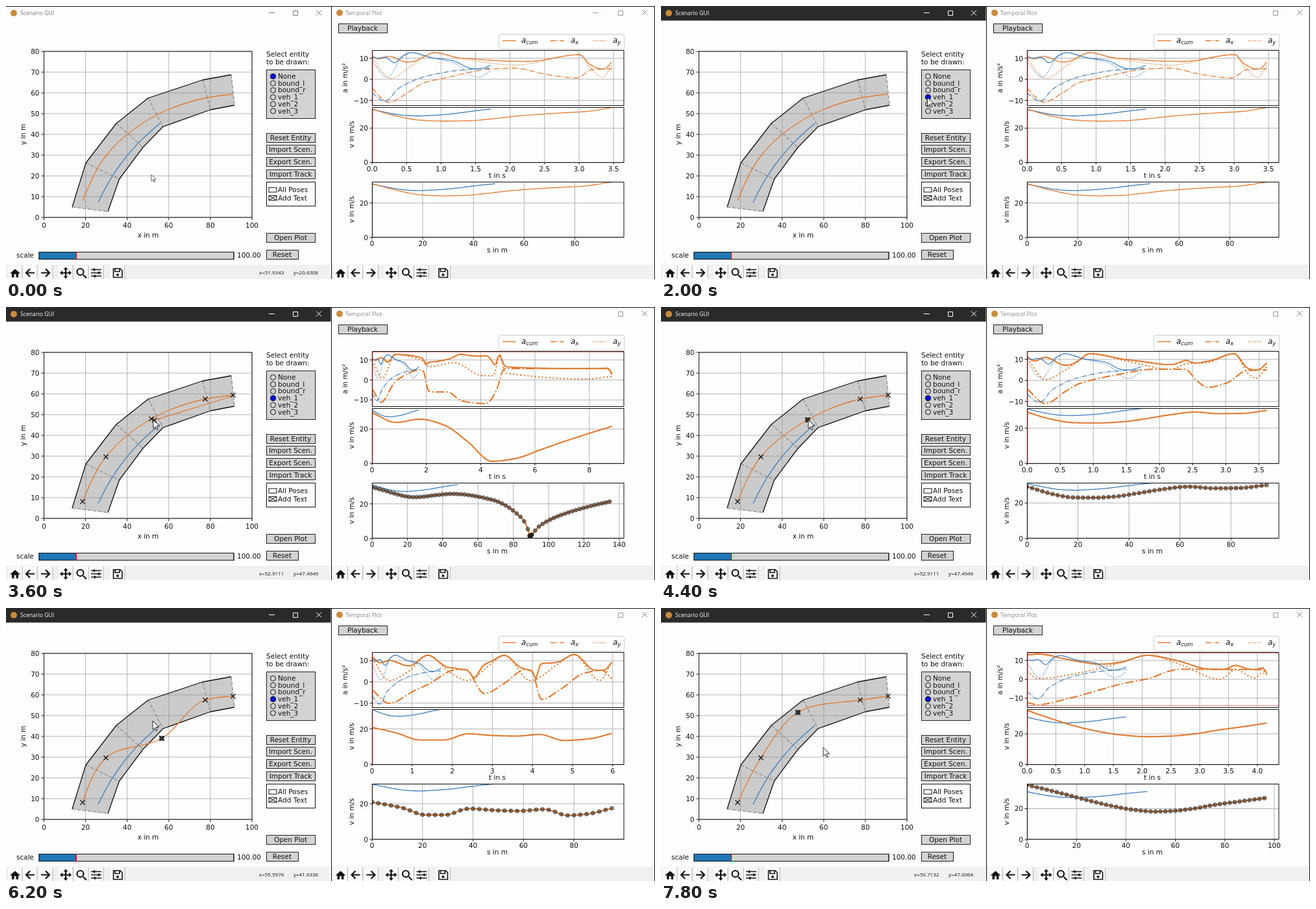
An HTML page that plays this animation: 1000x421 px, repeating every 8 s.

```html
<!DOCTYPE html>
<html lang="en">
<head>
<meta charset="utf-8">
<title>Scenario GUI</title>
<style>
html, body { margin: 0; width: 100%; height: 100%; overflow: hidden; background: #fdfdfd; }
svg { display: block; width: 100vw; height: 100vh; }
text { font: 10.5px "DejaVu Sans", sans-serif; fill: #111; }
.ui { font: 8.7px "Open Sans", "Noto Sans", sans-serif; }
.pos { font: 8px "Open Sans", "Noto Sans", sans-serif; }
.math { font: italic 12px "DejaVu Sans", sans-serif; }
.sub { font-size: 8.4px; }
.mid { text-anchor: middle; }
.end { text-anchor: end; }
.line { fill: none; stroke-linejoin: round; }
.grid { stroke: #b4b4b4; stroke-width: 1; }
.tick { stroke: #111; stroke-width: 1; }
.frame { fill: none; stroke: #111; stroke-width: 1; }
.btn { fill: #d3d3d3; stroke: #222; stroke-width: 1; }
.icon { fill: none; stroke: #111; stroke-width: 2.2; }
.limit { stroke: #f22; stroke-width: 1; opacity: .6; }
</style>
</head>
<body>
<svg viewBox="0 0 1000 421">
  <defs>
    <clipPath id="c1"><rect x="564" y="68" width="388" height="85"/></clipPath>
    <clipPath id="c2"><rect x="564" y="156" width="388" height="85"/></clipPath>
    <clipPath id="c3"><rect x="564" y="271" width="388" height="86"/></clipPath>
  </defs>
  <g id="fixed"></g>
  <g id="live"></g>
</svg>
<script>
const LOOP = 8000, STEP = 200, N = 120, X0 = 564, W = 369.5, OTHER_W = 183, OTHER_S = 48.6;
const ORANGE = '#e07a30', BLUE = '#3f7fbe';
const lerp = (a, b, k) => a + (b - a) * k;
const unit = (t, a, b) => Math.min(1, Math.max(0, (t - a) / (b - a)));

// ---------- svg helpers ----------
const text = (x, y, s, c = '', more = '') => `<text x="${x}" y="${y}" class="${c}" ${more}>${s}</text>`;
const rect = (x, y, w, h, c, more = '') => `<rect x="${x}" y="${y}" width="${w}" height="${h}" class="${c}" ${more}/>`;
const path = (d, c = 'line', more = '') => `<path d="${d}" class="${c}" ${more}/>`;
const seg = (x1, y1, x2, y2, c, more = '') => path(`M${x1} ${y1}L${x2} ${y2}`, c, more);
const circle = (x, y, r, more) => `<circle cx="${x}" cy="${y}" r="${r}" ${more}/>`;
const poly = pts => 'M' + pts.map(p => p[0].toFixed(1) + ' ' + p[1].toFixed(1)).join('L');
const turned = (x, y, s) => text(x, y, s, 'mid', `transform="rotate(-90 ${x} ${y})"`);
const button = (x, y, w, s) => rect(x + .5, y + .5, w, 14, 'btn') + text(x + w / 2, y + 10.5, s, 'mid');

// ---------- curves ----------
// Monotone cubic through x,y points, sampled evenly.
function resample(p, w) {
  const d = p.slice(1).map((q, i) => (q[1] - p[i][1]) / (q[0] - p[i][0]));
  const m = p.map((_, i) => {
    if (!i) return d[0];
    if (i === d.length) return d[i - 1];
    return d[i - 1] * d[i] <= 0 ? 0 : 2 * d[i - 1] * d[i] / (d[i - 1] + d[i]);
  });
  return Array.from({ length: N + 1 }, (_, n) => {
    const x = Math.min(p[p.length - 1][0], Math.max(p[0][0], X0 + w * n / N));
    let i = 0;
    while (i < d.length - 1 && x > p[i + 1][0]) i++;
    const h = p[i + 1][0] - p[i][0], u = (x - p[i][0]) / h, v = 1 - u;
    return p[i][1] * v * v * (1 + 2 * u) + p[i + 1][1] * u * u * (3 - 2 * u) + h * u * v * (m[i] * v - m[i + 1] * u);
  });
}
const pairs = flat => flat.flatMap((x, i) => i % 2 ? [] : [[x, flat[i + 1]]]);
const even = (ys, w) => ys.map((y, i) => [X0 + w * i / (ys.length - 1), y]);

// t, s: end of run; v: top of speed axis; zero, scale: acceleration axis; gap: dot spacing in m
function run(t, s, v, zero, scale, gap, lon, lat, vel, w = W) {
  const r = { t, s, v, zero, scale, gap };
  r.lon = resample(pairs(lon), w);
  r.lat = resample(pairs(lat), w);
  r.vel = resample(even(vel, w), w);
  r.cum = r.lon.map((y, i) => zero - Math.hypot(zero - y, zero - r.lat[i]));
  return r;
}

const first = run(3.475, 94.6, 32.3, 113, 3.25, 2,
  [565,127, 575,139, 590,148.5, 620,133, 645,118, 672,112, 750,97, 785,96, 830,105, 880,111, 903,98, 933,97],
  [565,80, 575,95, 592,112, 625,92, 645,78, 660,72, 700,81, 785,91, 884,75, 900,95, 920,110, 933,92],
  [159, 169.5, 176, 177.5, 177, 174, 170, 167, 164.7, 162.5, 156.5]);
const extra = run(8.83, 135.8, 32.2, 112.5, 3.08, 2.1,
  [565,127, 578,147, 600,115, 632,98, 642,97, 652,131, 680,131, 703,145, 740,149, 755,130, 768,95, 928,95, 933,104],
  [565,83, 580,110, 600,73, 640,82, 652,92, 690,86, 735,106, 752,106, 760,73, 770,102, 895,111, 933,107],
  [163, 178, 173, 182, 208, 238, 233.5, 220.5, 207.5, 195.5, 184]);
const fitted = run(3.62, 94.1, 31.4, 113.3, 3.25, 2,
  [565,127, 592,149, 625,129, 645,118, 700,105, 760,96, 808,96, 825,113, 842,124, 872,117, 903,98, 933,97],
  [565,80, 592,112, 625,96, 645,82, 660,72, 720,84, 785,96, 812,87, 840,86, 883,72, 905,103, 917,110, 933,92],
  [162, 173, 178.5, 178.8, 177, 172, 166, 162, 164.5, 164, 159.5]);
const bent = run(5.98, 95, 31.2, 114, 3.27, 2.5,
  [565,127, 590,147, 630,127, 650,118, 695,95, 708,95, 737,132, 768,116, 800,95, 810,97, 825,141, 855,125, 890,101, 918,96, 933,109],
  [565,78, 590,112, 620,98, 650,73, 685,100, 712,112, 745,88, 768,73, 808,112, 850,87, 875,72, 915,112, 933,84],
  [184, 192.5, 203.5, 203.5, 194, 196.5, 197.5, 195, 204.3, 202, 193.5]);
const wide = run(4.21, 97.4, 35.9, 110, 2.9, 2,
  [565,146, 580,149, 630,139, 710,117, 750,109, 800,94.5, 927,95, 933,103],
  [565,98, 580,109, 640,101, 710,84, 750,73, 800,87, 862,110, 885,95, 915,108, 927,100, 933,103],
  [158, 170.5, 182, 190.5, 196, 198.4, 197.5, 194, 188, 183, 177.5]);
const settled = { ...wide, t: 4.165, s: 97, v: 36.2 };

// The second vehicle never changes; it is given on the first run's axes.
const other = run(first.t, OTHER_S, first.v, first.zero, first.scale, 2,
  [565,135, 584,147, 605,127, 645,109, 700,99, 747,96],
  [565,86, 587,110, 612,78, 625,72, 655,80, 690,88, 727,110, 747,100],
  [159.5, 163.5, 167, 169, 169.5, 168.7, 167.5, 165.7, 163.3, 161, 159], OTHER_W);

function mix(a, b, k) {
  const out = {};
  for (const key in a)
    out[key] = Array.isArray(a[key]) ? a[key].map((y, i) => lerp(y, b[key][i], k)) : lerp(a[key], b[key], k);
  return out;
}

// ---------- timeline ----------
const SELECT = 1800, EDIT = 2200, APPEND = 3200, FIT = 4400;
const DRAG = 5200, BENT = 6200, WIDE = 7000, LAST = 7800;

function runAt(t) {
  if (t < APPEND) return first;
  if (t < FIT) return extra;
  if (t < BENT) return mix(fitted, bent, unit(t, DRAG, BENT));
  if (t < WIDE) return mix(bent, wide, unit(t, BENT, WIDE));
  return mix(wide, settled, unit(t, WIDE, LAST));
}

function track(keys, t) {
  let i = 0;
  while (i < keys.length - 2 && t >= keys[i + 1][0]) i++;
  const [a, b] = [keys[i], keys[i + 1]], k = unit(t, a[0], b[0]);
  return a.slice(1).map((v, j) => lerp(v, b[j + 1], k));
}
const pointer = [[0, 224, 260], [1200, 410.5, 141], [2000, 410.5, 141], [3000, 227, 174], [4800, 227, 174],
  [DRAG, 237, 191], [5800, 240, 201], [BENT, 226, 174], [WIDE, 209, 159], [7200, 210, 160], [LAST, 250, 215]];
const coords = [[0, 51.9343, 20.6306], [2000, 110, 57], [3000, 52.9111, 47.4949], [FIT, 52.9111, 47.4949],
  [DRAG, 52.6669, 47.0064], [BENT, 55.5976, 41.6336], [WIDE, 47.2941, 51.6466], [LAST, 50.7132, 47.0064]];
const handle = [[0, 224, 172.5], [4200, 224, 172.5], [FIT, 226, 174], [DRAG, 226, 174], [BENT, 240, 201],
  [WIDE, 211, 160], [LAST, 211, 161]];

// ---------- fixed parts ----------
function toolbar(dx) {
  const slot = [14, 37, 61, 92, 116, 139, 172];
  const glyph = [
    path('M-8 1L0 -6L8 1H5V7H1.5V2H-1.5V7H-5V1Z', '', 'fill="#111"'),
    path('M7 0H-6M0 -6L-6 0L0 6', 'icon'),
    path('M-7 0H6M0 -6L6 0L0 6', 'icon'),
    path('M-6 0H6M0 -6V6', 'icon') + [0, 90, 180, 270].map(a => path('M9 0l-4 -3.5v7Z', '', `fill="#111" transform="rotate(${a})"`)).join(''),
    path('M3 3L8 8', 'icon') + circle(-1.5, -1.5, 5, 'class="icon"'),
    path('M-8 -5H8M-8 0H8M-8 5H8', 'icon', 'style="stroke-width:1.5"') + path('M-3 -7v4M4 -2v4M-2 3v4', 'icon'),
    path('M-6.5 -6.5H4L7 -3.5V7H-6.5ZM-4 -6V-2H3V-6', 'icon', 'style="stroke-width:1.6"') + circle(0, 3, 2, 'fill="#111"')
  ];
  return rect(dx, 399, 499, 22, '', 'fill="#f0f0f1"') + slot.map((x, i) =>
    rect(dx + x - 11, 400, 22, 21, '', 'fill="#fafafa"') + seg(dx + x + 11, 400, dx + x + 11, 421, 'grid') +
    `<g transform="translate(${dx + x} 411.5)">${glyph[i]}</g>`).join('');
}

function scenario() {
  let s = '';
  for (let i = 0; i <= 5; i++) {
    const x = 58.5 + i * 64.1;
    s += seg(x, 70, x, 326, 'grid') + seg(x, 326, x, 330, 'tick') + text(x, 342, i * 20, 'mid');
  }
  for (let i = 0; i <= 8; i++) {
    const y = 326 - i * 32;
    s += seg(58, y, 379, y, 'grid') + seg(54.5, y, 58, y, 'tick') + text(51.5, y + 4, i * 10, 'end');
  }
  const left = [[102, 310], [123, 242], [170, 181], [219, 142], [303, 114], [347, 106]];
  const right = [[157, 317], [174.5, 267], [211, 218], [242, 186], [315, 160], [352, 153]];
  s += path(poly([...left, ...right.slice().reverse()]) + 'Z', '', 'fill="#808080" opacity=".4"');
  left.forEach((p, i) => s += path(poly([p, right[i]]), 'line', 'stroke="#999" stroke-width="1.6" stroke-dasharray="5.5 2.5"'));
  s += [left, right].map(b => path(poly(b), 'line', 'stroke="#111" stroke-width="1.3"')).join('');
  s += path('M142 303C147 292 157 271 175 246S209 205 237 181', 'line', `stroke="${BLUE}" stroke-width="1.3"`);
  return s + rect(58.5, 70, 320.5, 256, 'frame') + text(219, 357, 'x in m', 'mid') + turned(30, 198, 'y in m');
}

function controls() {
  let s = text(401, 78, 'Select entity') + text(401, 90, 'to be drawn:') + rect(401.5, 98.5, 75, 75, 'btn');
  ['None', 'bound_l', 'bound_r', 'veh_1', 'veh_2', 'veh_3'].forEach((n, i) =>
    s += circle(411.5, 108.5 + i * 10.7, 4, 'class="frame"') + text(419, 112 + i * 10.7, n));
  ['Reset Entity', 'Import Scen.', 'Export Scen.', 'Import Track'].forEach((n, i) => s += button(401, 196 + Math.floor(i * 18.8), 75, n));
  s += button(401, 350, 75, 'Open Plot') + button(401, 376, 49, 'Reset') + button(512, 27, 75, 'Playback');
  s += rect(401.5, 271.5, 75, 37, 'frame') + rect(405, 280, 12, 7, 'frame') + rect(405, 292.5, 12, 7, 'frame') +
    path('M405 292.5l12 7m0 -7l-12 7', 'frame') + text(419, 287, 'All Poses') + text(419, 299.5, 'Add Text');
  return s + text(16, 388, 'scale') + rect(51, 379.5, 300, 11, 'btn') + rect(51, 380, 57, 10, '', 'fill="#1f77b4"') +
    rect(51, 379.5, 300, 11, 'frame') + seg(108.5, 379, 108.5, 391, '', 'stroke="#f00" stroke-width="1.2"') + text(356, 388, '100.00');
}

function temporal() {
  let s = circle(514, 10.5, 5, 'fill="#c98a3c"') + text(523, 14, 'Temporal Plot', 'ui', 'style="fill:#888"');
  s += path('M943.5 7.5h7v7h-7Z', 'frame', 'style="stroke:#999"') + path('M980 6l8 8m0 -8l-8 8', 'frame', 'style="stroke:#888"');
  s += rect(759.5, 43.5, 193, 23, '', 'rx="2" fill="#fff" stroke="#ccc"');
  [[765, 794, 'cum', ''], [839, 870, 'x', '9 2.2 1.5 2.2'], [905, 935, 'y', '1.4 2']].forEach(([x, tx, sub, dash]) =>
    s += seg(x, 53.5, x + 21, 53.5, 'line', `stroke="${ORANGE}" stroke-width="1.4" stroke-dasharray="${dash}"`) +
      text(tx, 57, `a<tspan class="math sub" dy="2">${sub}</tspan>`, 'math'));
  s += turned(526, 111, 'a in m/s²') + turned(536, 198, 'v in m/s') + turned(536, 314, 'v in m/s');
  return s + text(757, 265, 't in s', 'mid') + text(757, 380, 's in m', 'mid');
}

const edges = () => seg(501.5, 0, 501.5, 421, 'tick') + seg(999.5, 0, 999.5, 421, 'tick') + seg(0, .5, 1000, .5, 'tick');

// ---------- moving parts ----------
function titleBar(active) {
  const ink = active ? '#fff' : '#777', st = `style="stroke:${ink}"`;
  return (active ? rect(0, 0, 500.5, 22.5, '', 'fill="#2b2a28"') : path('M904 10.5h9', 'frame', 'style="stroke:#999"')) +
    circle(12, 11, 5, 'fill="#c98a3c"') + text(22, 14, 'Scenario GUI', 'ui', `style="fill:${ink}"`) +
    path('M405 10.5h9', 'frame', st) + path('M442.5 7.5h7v7h-7Z', 'frame', st) + path('M478 6.5l8 8m0 -8l-8 8', 'frame', st);
}

// Smooth path with chord-weighted tangents.
function spline(p) {
  const h = [], d = [];
  for (let i = 0; i < p.length - 1; i++) {
    const dx = p[i + 1][0] - p[i][0], dy = p[i + 1][1] - p[i][1];
    h.push(Math.hypot(dx, dy));
    d.push([dx / h[i], dy / h[i]]);
  }
  const n = h.length;
  const m = p.map((_, i) => !i || i === n ? null :
    [0, 1].map(c => (d[i - 1][c] * h[i] + d[i][c] * h[i - 1]) / (h[i - 1] + h[i])));
  m[0] = d[0].map((v, c) => 1.5 * v - .5 * m[1][c]);
  m[n] = d[n - 1].map((v, c) => 1.5 * v - .5 * m[n - 1][c]);
  return `M${p[0]}` + h.map((l, i) => 'C' + [0, 1].map(c => p[i][c] + m[i][c] * l / 3) + ' ' +
    [0, 1].map(c => p[i + 1][c] - m[i + 1][c] * l / 3) + ' ' + p[i + 1]).join('');
}

function vehicle(t) {
  const pts = [[118, 300], [154, 231], track(handle, t), [307, 142], [350, 136]];
  const appended = t >= APPEND && t < FIT;
  let s = path(spline(pts) + (appended ? 'M350 137Q290 156 228.5 174.5' : ''), 'line', `stroke="${ORANGE}" stroke-width="1.3"`);
  if (t < EDIT) return s;
  if (appended) pts.push([228.5, 174.5]);
  if (t >= FIT) s += rect(pts[2][0] - 3, pts[2][1] - 3, 6, 6, 'frame', 'style="fill:#555a"');
  return s + pts.map(([x, y]) => path(`M${x - 3.5} ${y - 3.5}l7 7m0 -7l-7 7`, 'line', 'stroke="#111" stroke-width="1.3"')).join('');
}

// Share of the distance covered at each sample.
function distance(vel) {
  const d = [0];
  for (let i = 1; i <= N; i++) d.push(d[i - 1] + 482 - vel[i] - vel[i - 1]);
  return d.map(v => v / d[N]);
}

function axes(r) {
  const span = r.t * 1.05, step = span > 7 ? 2 : span > 4.5 ? 1 : .5;
  let s = '';
  for (let v = 0; v < span; v += step) {
    const x = X0 + W * v / r.t;
    s += seg(x, 68, x, 153, 'grid') + seg(x, 156, x, 241, 'grid') + seg(x, 241, x, 244, 'tick') +
      text(x, 254.5, step < 1 ? v.toFixed(1) : v, 'mid');
  }
  for (let v = 0; v < r.s * 1.05; v += 20) {
    const x = X0 + W * v / r.s;
    s += seg(x, 271, x, 357, 'grid') + seg(x, 357, x, 360, 'tick') + text(x, 370, v, 'mid');
  }
  const row = (y, label) => seg(X0, y, 952, y, 'grid') + seg(X0 - 3.5, y, X0, y, 'tick') + text(558, y + 4, label, 'end');
  for (const a of [-10, 0, 10]) s += row(r.zero - a * r.scale, a < 0 ? '−10' : a);
  for (const v of [0, 20]) s += row(241 - 85 * v / r.v, v) + row(357 - 86 * v / r.v, v);
  return s;
}

function plots(r, bold) {
  let s = axes(r);
  const low = y => 357 - (241 - y) * 86 / 85;
  const stroke = (pts, color, w, dash = []) => path(poly(pts), 'line',
    `stroke="${color}" stroke-width="${w}" stroke-dasharray="${dash.map(v => v * w)}"`);
  const dashes = { lat: [1, 1.65], lon: [6.4, 1.6, 1, 1.6], cum: [] };
  const w = bold ? 2.1 : 1.3;
  const timeX = i => X0 + W * i / N;
  const otherX = i => X0 + OTHER_W * i / N * other.t / r.t;
  const otherV = other.vel.map(y => 241 - (241 - y) * other.v / r.v);
  let acc = '';
  for (const k in dashes) {
    acc += stroke(r[k].map((y, i) => [timeX(i), y]), ORANGE, w, dashes[k]);
    acc += stroke(other[k].map((y, i) => [otherX(i), r.zero - (other.zero - y) / other.scale * r.scale]), BLUE, 1.2, dashes[k]);
  }
  for (const a of [-14, 14]) acc += seg(X0, r.zero - a * r.scale, 952, r.zero - a * r.scale, 'limit');
  const vel = stroke(otherV.map((y, i) => [otherX(i), y]), BLUE, 1.3) + stroke(r.vel.map((y, i) => [timeX(i), y]), ORANGE, w);

  const far = distance(r.vel), farOther = distance(other.vel);
  let dist = stroke(otherV.map((y, i) => [X0 + W * farOther[i] * OTHER_S / r.s, low(y)]), BLUE, 1.3) +
    stroke(r.vel.map((y, i) => [X0 + W * far[i], low(y)]), ORANGE, w);
  if (bold) {
    const dot = (f, y) => circle((X0 + W * f).toFixed(1), low(y).toFixed(1), 3, 'fill="#2a211c" fill-opacity=".55" stroke="#222" stroke-opacity=".6"');
    for (let m = 0, i = 0; m <= r.s; m += r.gap) {
      const f = m / r.s;
      while (i < N - 1 && far[i + 1] < f) i++;
      dist += dot(f, lerp(r.vel[i], r.vel[i + 1], (f - far[i]) / (far[i + 1] - far[i])));
    }
    r.vel.forEach((y, i) => { if (y > 235) dist += dot(far[i], y); });
  }
  [acc, vel, dist].forEach((g, i) => s += `<g clip-path="url(#c${i + 1})">${g}</g>`);
  for (const y of [68.5, 156.5, 271.5]) s += rect(564.5, y, 387.5, 85, 'frame');
  return s + seg(565, 68, 565, 153, 'limit') + seg(565, 156, 565, 241, 'limit');
}

function draw(t) {
  const [x, y] = track(pointer, t), [cx, cy] = track(coords, t);
  let s = titleBar(t >= SELECT) + vehicle(t) + plots(runAt(t), t >= EDIT);
  s += circle(411.5, t < SELECT ? 108.5 : 140.6, 4, 'fill="#00f" stroke="#111"');
  if (x > 58 && x < 379) s += text(390, 414, 'x=' + cx.toFixed(4), 'pos') + text(443, 414, 'y=' + cy.toFixed(4), 'pos');
  s += path('M0 0V13.5L3.2 10.6L5.3 15.4L7.3 14.5L5.2 9.8H9.6Z', '',
    `transform="translate(${x} ${y}) scale(${t ? 1 : .75})" fill="#fff" stroke="#111" stroke-width=".9"`);
  document.getElementById('live').innerHTML = s;
}

document.getElementById('fixed').innerHTML = toolbar(0) + toolbar(501.5) + edges() + scenario() + controls() + temporal();
const start = performance.now();
let shown = -1;
function tick(now) {
  const t = Math.floor(Math.max(0, now - start) % LOOP / STEP) * STEP;
  if (t !== shown) draw(shown = t);
  requestAnimationFrame(tick);
}
draw(0);
requestAnimationFrame(tick);
</script>
</body>
</html>
```
